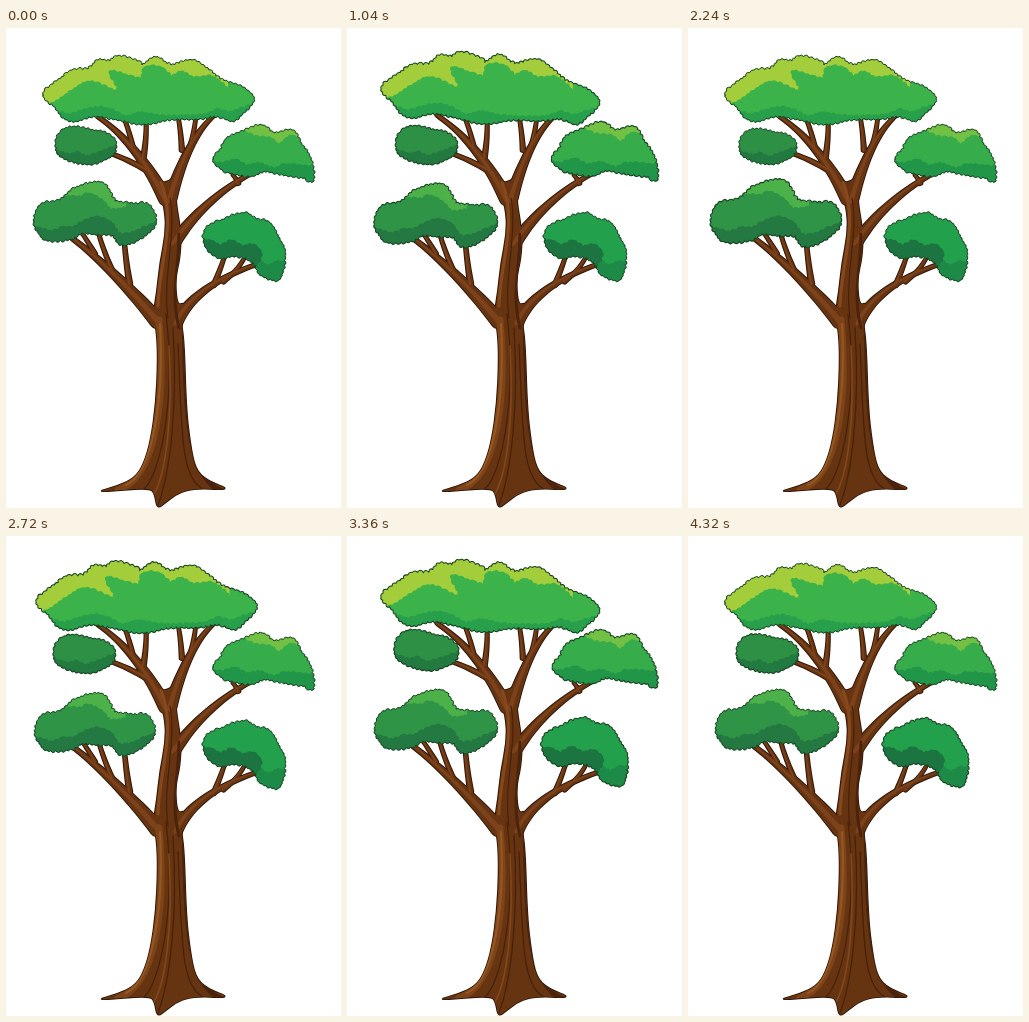
An HTML page with a canvas for the animation above (4400 ms loop, 335 px wide and 480 px high).

```html
<!DOCTYPE html>
<html lang="en">
<head>
<meta charset="utf-8">
<title>Swaying tree</title>
<style>
html, body { margin: 0; width: 100%; height: 100%; overflow: hidden; background: #fff; }
canvas { display: block; width: 335px; height: 480px; }
</style>
</head>
<body>
<canvas id="stage"></canvas>
<script>
const W = 335, H = 480, LOOP = 4400, TICK = 80;
const canvas = document.getElementById('stage');
const ctx = canvas.getContext('2d');
const ratio = Math.max(1, window.devicePixelRatio || 1);
canvas.width = W * ratio;
canvas.height = H * ratio;

let seed = 11;
const rand = () => (seed = (seed * 16807) % 2147483647) / 2147483647;
const pairs = list => list.flatMap((v, i) => i % 2 ? [] : [[v, list[i + 1]]]);

// Closed smooth curve through the midpoints of a polygon
function smooth(pts) {
  const path = new Path2D(), n = pts.length;
  const mid = i => {
    const a = pts[i % n], b = pts[(i + 1) % n];
    return [(a[0] + b[0]) / 2, (a[1] + b[1]) / 2];
  };
  path.moveTo(...mid(n - 1));
  for (let i = 0; i < n; i++) path.quadraticCurveTo(...pts[i], ...mid(i));
  path.closePath();
  return path;
}

// Catmull-Rom value
const spline = (a, b, c, d, u) =>
  b + u / 2 * (c - a + u * (2 * a - 5 * b + 4 * c - d + u * (3 * (b - c) + d - a)));

// Small leaf bumps along a line of points, on its left-hand side
function addLeaves(path, pts, size, bulge) {
  for (let i = 1; i < pts.length; i++) {
    const [ax, ay] = pts[i - 1], [bx, by] = pts[i];
    const m = 0.3 + rand() * 0.4, h = bulge * (0.7 + rand() * 0.7) / size;
    path.quadraticCurveTo(ax + (bx - ax) * m + (by - ay) * h, ay + (by - ay) * m - (bx - ax) * h, bx, by);
  }
}

function sample(pts, size, closed) {
  const n = pts.length, out = [pts[0]];
  const at = i => closed ? pts[(i + n) % n] : pts[Math.max(0, Math.min(n - 1, i))];
  for (let i = 0; i < (closed ? n : n - 1); i++) {
    const [a, b, c, d] = [at(i - 1), at(i), at(i + 1), at(i + 2)];
    const steps = Math.max(1, Math.round(Math.hypot(c[0] - b[0], c[1] - b[1]) / size));
    for (let k = 1; k <= steps; k++) out.push([0, 1].map(j => spline(a[j], b[j], c[j], d[j], k / steps)));
  }
  return out;
}

function crown(flat) {
  const pts = sample(pairs(flat), 4.6, true), path = new Path2D();
  path.moveTo(...pts[0]);
  addLeaves(path, pts, 4.6, 2.6);
  path.closePath();
  return path;
}

// Shade on one side of a boundary: far is the y where it closes
function shade(color, far, flat) {
  const pts = sample(pairs(flat), 5.5, false), path = new Path2D();
  path.moveTo(pts[0][0], far);
  path.lineTo(...pts[0]);
  addLeaves(path, pts, 5.5, 2.2);
  path.lineTo(pts[pts.length - 1][0], far);
  path.closePath();
  return { color, path };
}

const wood = [], gloss = [], grain = [], clumps = [];

// Tapered branch: quadratic spine, half-width from w0 to w1
function limb(x0, y0, cx, cy, x1, y1, w0, w1) {
  const build = (grow, off) => {
    const left = [], right = [];
    for (let i = 0; i <= 10; i++) {
      const u = i / 10, v = 1 - u, w = (w0 + (w1 - w0) * u ** 1.5) * grow;
      const dx = v * (cx - x0) + u * (x1 - cx), dy = v * (cy - y0) + u * (y1 - cy);
      const l = Math.hypot(dx, dy) || 1;
      const x = v * v * x0 + 2 * u * v * cx + u * u * x1 - off;
      const y = v * v * y0 + 2 * u * v * cy + u * u * y1 - off;
      left.push([x - dy / l * w, y + dx / l * w]);
      right.unshift([x + dy / l * w, y - dx / l * w]);
    }
    return smooth([...left, ...right]);
  };
  wood.push(build(1, 0));
  gloss.push(build(0.38, 0.6));
}

function streak(color, width, d) {
  grain.push({ color, width, path: new Path2D(d) });
}

const trunk = smooth(pairs([
  90,464, 112,458, 129,450, 138,436, 145,412, 150,376, 152,335, 151,304, 147,288, 151,264,
  154,235, 160,205, 159,180, 149,150, 160,156, 171,146, 169,170, 175,204, 174,230, 169,250,
  171,278, 179,274, 175,294, 178,314, 180,380, 184,415, 189,441, 201,453, 226,462, 190,460,
  172,465, 160,474, 151,481, 149,466, 144,460, 114,462]));
wood.push(trunk);

// left lower bough and twigs
limb(62, 207, 108, 241, 156, 298, 2, 8);
limb(76, 205, 82, 214, 90, 227, 1.5, 2);
limb(92, 203, 97, 222, 107, 244, 1.6, 2.2);
limb(118, 210, 120, 235, 124, 258, 1.8, 2.8);
// left upper
limb(88, 86, 132, 114, 162, 176, 1.7, 7);
limb(98, 123, 122, 131, 148, 146, 1.6, 3);
limb(118, 90, 124, 105, 128, 124, 1.6, 2.2);
limb(140, 90, 141, 110, 137, 132, 1.6, 2.6);
// right upper
limb(212, 84, 181, 108, 163, 176, 1.5, 6.5);
limb(172, 88, 175, 104, 176, 124, 1.5, 2.4);
limb(190, 88, 188, 106, 184, 119, 1.5, 2.3);
// right middle
limb(258, 139, 200, 166, 166, 218, 1.6, 6);
limb(226, 146, 230, 150, 233, 157, 1.3, 2);
// right lower
limb(258, 234, 187, 256, 169, 298, 1.6, 6);
limb(220, 224, 215, 240, 207, 259, 1.5, 2.5);
limb(240, 226, 235, 240, 216, 255, 1.4, 2);

streak('#7d4319', 7, 'M153 292C160 370 150 450 112 462');
streak('#96561f', 2.2, 'M154 296C158 370 147 445 120 457');
streak('#87491b', 3, 'M152 278C153 235 171 195 155 154');
streak('#4b230c', 5, 'M178 292C180 380 180 450 216 463');
streak('#4b230c', 3, 'M173 206C173 240 164 265 173 300');
streak('#48210b', 1.3, 'M160 286C170 370 155 445 138 461');
streak('#48210b', 1.3, 'M167 300C172 380 164 445 152 477');
streak('#48210b', 1.3, 'M172 316C176 400 174 450 197 461');
streak('#48210b', 1.2, 'M162 290C156 250 171 205 164 170');
streak('#85481b', 1.5, 'M163 318C167 390 160 445 148 466');

// Times of the sway; each clump names its pose at these times by letter
const times = [0, 240, 560, 840, 1160, 1520, 1940, 2240, 2400, 2720, 3040, 3360, 3600, 3840, 4160, 4319, 4320];
const REST = [0, 0, 1, 0];
const clump = c => clumps.push({ ...c, shape: crown(c.edge) });

// poses: dx, dy, scale, degrees
clump({
  at: [80.5, 118], fill: '#2d9044',
  edge: [50,120, 51,110, 58,101, 70,99, 84,102, 96,104, 109,112, 108,125, 98,132, 83,136, 66,133, 53,127],
  parts: [shade('#237a40', 150, [44,120, 64,126, 72,123, 80,128, 101,121, 116,115])],
  poses: { r: REST, s: [0, 1, .94, 0], t: [-.5, -.5, 1.01, 1], u: [-1.5, .5, 1.01, 0],
    b: [-.5, -3, 1.05, 3], e: [-.5, 0, 1.01, 0] },
  sway: 'rrsrttrssurbrrsse'
});
clump({
  at: [143, 62], fill: '#3bb34a',
  edge: [37,67, 47,56, 58,48, 66,42, 82,41, 92,32, 104,33, 111,28, 131,33, 136,37, 150,29, 165,37,
    186,32, 203,42, 214,51, 236,59, 248,71, 237,85, 226,93, 212,88, 190,91, 166,91, 138,96, 114,92,
    88,88, 70,93, 58,90, 49,79],
  parts: [
    shade('#a3cd3b', 10, [28,78, 48,74, 66,62, 84,53, 111,62, 103,43, 122,47, 135,50, 138,39, 156,39,
      165,48, 175,43, 188,49, 206,48, 222,60]),
    shade('#279f4b', 110, [38,80, 64,86, 76,82, 98,79, 120,88, 134,84, 160,88, 200,86, 211,80, 222,84, 254,74])
  ],
  poses: { r: REST, b: [-2, -1, 1.045, 0], t: [1, -1.5, 1.035, 2.4], s: [1, -1.5, 1.012, 2.2],
    m: [-1, -1, 1.04, 1] },
  sway: 'rrbttsrrrbmtrrssr'
});
clump({
  at: [257, 126], fill: '#36ad4a',
  edge: [207,131, 216,120, 220,111, 238,103, 256,97, 268,105, 286,102, 294,114, 305,132, 307,154,
    299,150, 280,147, 258,143, 246,148, 222,144, 213,139],
  parts: [
    shade('#72c044', 85, [238,102, 248,108, 266,110, 273,116, 286,107, 304,120]),
    shade('#229648', 165, [200,132, 217,135, 229,131, 240,137, 254,135, 268,140, 280,136, 312,139])
  ],
  poses: { r: REST, u: [0, -2, 1.035, -1.4], b: [0, -1.5, 1.055, -.8] },
  sway: 'rruubbrrrrrurrbbr'
});
clump({
  at: [89, 183.5], fill: '#2f9446',
  edge: [28,194, 34,177, 54,172, 69,160, 94,154, 104,164, 109,173, 132,176, 143,177, 150,194,
    138,208, 122,216, 112,215, 107,207, 88,206, 76,205, 64,211, 40,212, 32,203],
  parts: [
    shade('#4bb148', 145, [60,168, 76,168, 83,165, 98,173, 105,181, 120,179]),
    shade('#237941', 225, [22,196, 46,203, 56,198, 66,199, 88,189, 106,194, 112,204, 124,205, 156,191])
  ],
  poses: { r: REST, b: [-1, -.5, 1.065, 0], m: [-.5, 0, 1.05, 0], d: [0, 2.8, .982, 0] },
  sway: 'rrbmddrbbdmrrrbbr'
});
clump({
  at: [238.5, 218.5], fill: '#22a04b',
  edge: [198,211, 200,200, 214,193, 238,185, 250,191, 264,195, 272,209, 279,224, 275,249, 268,252,
    253,246, 250,238, 240,230, 226,228, 214,230, 201,221],
  parts: [
    shade('#1e8a47', 262, [246,226, 262,237, 270,233, 286,236]),
    shade('#1c7440', 240, [190,212, 205,212, 215,217, 226,212, 236,218, 246,216, 256,225, 250,238])
  ],
  poses: { r: REST, t: [.5, 1.5, .965, 3.5], s: [0, 1, .98, 2.5], b: [-.5, -2, 1.035, -3],
    e: [-.5, -1.5, 1.028, -2.3] },
  sway: 'rrtrrsrrrrrbrreee'
});

// Spans in which the picture stands still
const holds = [[0, 320], [2240, 2400], [2880, 3040], [3680, 3920], [4160, 4320]];
function stepTime(ms) {
  const t = Math.floor((ms % LOOP) / TICK) * TICK;
  const hold = holds.find(([a, b]) => t >= a && t < b);
  return hold ? hold[0] : t;
}

function poseAt(c, t) {
  const i = times.findIndex(v => v > t);
  const key = j => c.poses[c.sway[j]];
  if (i < 0) return key(times.length - 1);
  const u = (t - times[i - 1]) / (times[i] - times[i - 1]);
  const k = (1 - Math.cos(Math.PI * u)) / 2;
  return key(i - 1).map((v, j) => v + (key(i)[j] - v) * k);
}

function drawWood() {
  ctx.lineJoin = ctx.lineCap = 'round';
  ctx.strokeStyle = '#2b1509';
  ctx.lineWidth = 1.8;
  wood.forEach(p => ctx.stroke(p));
  ctx.fillStyle = '#673411';
  wood.forEach(p => ctx.fill(p));
  ctx.fillStyle = '#7c421b';
  gloss.forEach(p => ctx.fill(p));
  ctx.save();
  ctx.clip(trunk);
  for (const { color, width, path } of grain) {
    ctx.strokeStyle = color;
    ctx.lineWidth = width;
    ctx.stroke(path);
  }
  ctx.restore();
}

function drawClump(c, t) {
  const [dx, dy, s, deg] = poseAt(c, t), [x, y] = c.at;
  ctx.save();
  ctx.translate(x + dx, y + dy);
  ctx.rotate(deg * Math.PI / 180);
  ctx.scale(s, s);
  ctx.translate(-x, -y);
  ctx.fillStyle = c.fill;
  ctx.fill(c.shape);
  ctx.save();
  ctx.clip(c.shape);
  for (const { color, path } of c.parts) {
    ctx.fillStyle = color;
    ctx.fill(path);
  }
  ctx.restore();
  ctx.strokeStyle = '#173f20';
  ctx.lineWidth = 1;
  ctx.stroke(c.shape);
  ctx.restore();
}

let shown = -1;
function draw(t) {
  if (t === shown) return;
  shown = t;
  ctx.setTransform(ratio, 0, 0, ratio, 0, 0);
  ctx.fillStyle = '#fff';
  ctx.fillRect(0, 0, W, H);
  drawWood();
  clumps.forEach(c => drawClump(c, t));
}

const start = performance.now();
function loop() {
  draw(stepTime(performance.now() - start));
  requestAnimationFrame(loop);
}
loop();
</script>
</body>
</html>
```
